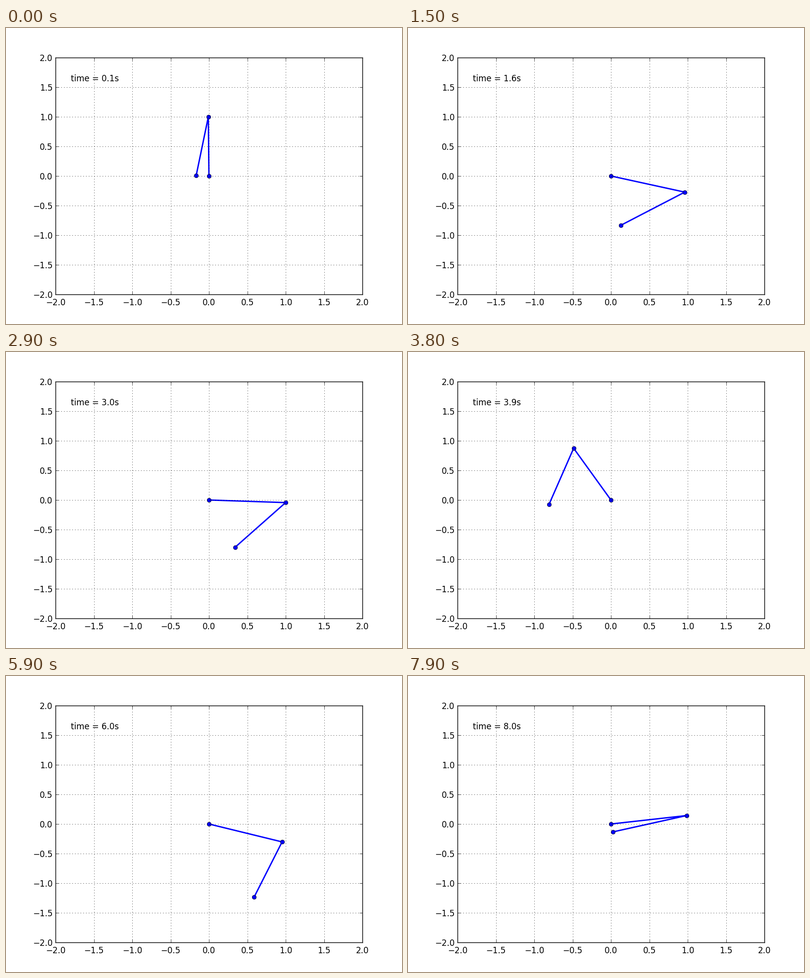
These frames come from a looping animation (800 by 600 pixels, 8 s). A matplotlib script:

```python
"""Animated double pendulum, released at rest from near the upright position."""
import numpy as np
import matplotlib.pyplot as plt
from math import sin, cos, radians
from matplotlib.animation import FuncAnimation

G = 9.8            # gravity, m/s^2
L1 = L2 = 1.0      # rod lengths, m
M1 = M2 = 1.0      # bob masses, kg
DT = 0.1           # seconds per frame
FRAMES = 80
SUBSTEPS = 100


def derivs(state):
    th1, w1, th2, w2 = state
    d = th2 - th1
    s, c = sin(d), cos(d)
    m = M1 + M2
    den = m - M2 * c * c
    a1 = (M2 * L1 * w1 * w1 * s * c + M2 * G * sin(th2) * c
          + M2 * L2 * w2 * w2 * s - m * G * sin(th1)) / (den * L1)
    a2 = (-M2 * L2 * w2 * w2 * s * c + m * G * sin(th1) * c
          - m * L1 * w1 * w1 * s - m * G * sin(th2)) / (den * L2)
    return np.array([w1, a1, w2, a2])


def rk4(y, h):
    k1 = derivs(y)
    k2 = derivs(y + h / 2 * k1)
    k3 = derivs(y + h / 2 * k2)
    k4 = derivs(y + h * k3)
    return y + h / 6 * (k1 + 2 * k2 + 2 * k3 + k4)


def simulate():
    y = np.array([radians(180), 0.0, radians(-10), 0.0])
    states = []
    for _ in range(FRAMES):
        for _ in range(SUBSTEPS):
            y = rk4(y, DT / SUBSTEPS)
        states.append(y)
    return np.array(states)


th1, _, th2, _ = simulate().T
x1, y1 = L1 * np.sin(th1), -L1 * np.cos(th1)
x2, y2 = x1 + L2 * np.sin(th2), y1 - L2 * np.cos(th2)

plt.style.use("classic")
plt.rcParams.update({
    "font.family": "DejaVu Sans",
    "font.size": 12,
    "xtick.major.pad": 5.5,
    "ytick.alignment": "center_baseline",
})

fig = plt.figure(figsize=(8, 6), dpi=100, facecolor="white")
ax = fig.add_subplot(autoscale_on=False, xlim=(-2, 2), ylim=(-2, 2))
ticks = np.arange(-2, 2.1, 0.5)
ax.set_xticks(ticks)
ax.set_yticks(ticks)
ax.grid(True)

rods, = ax.plot([], [], "o-", color="b", lw=2, ms=6, mec="k", mew=0.5)
label = ax.text(0.05, 0.9, "", transform=ax.transAxes)


def draw(i):
    rods.set_data([0, x1[i], x2[i]], [0, y1[i], y2[i]])
    label.set_text(f"time = {(i + 1) * DT:.1f}s")
    return rods, label


anim = FuncAnimation(fig, draw, frames=FRAMES, interval=1000 * DT, repeat=True)
plt.show()
```
